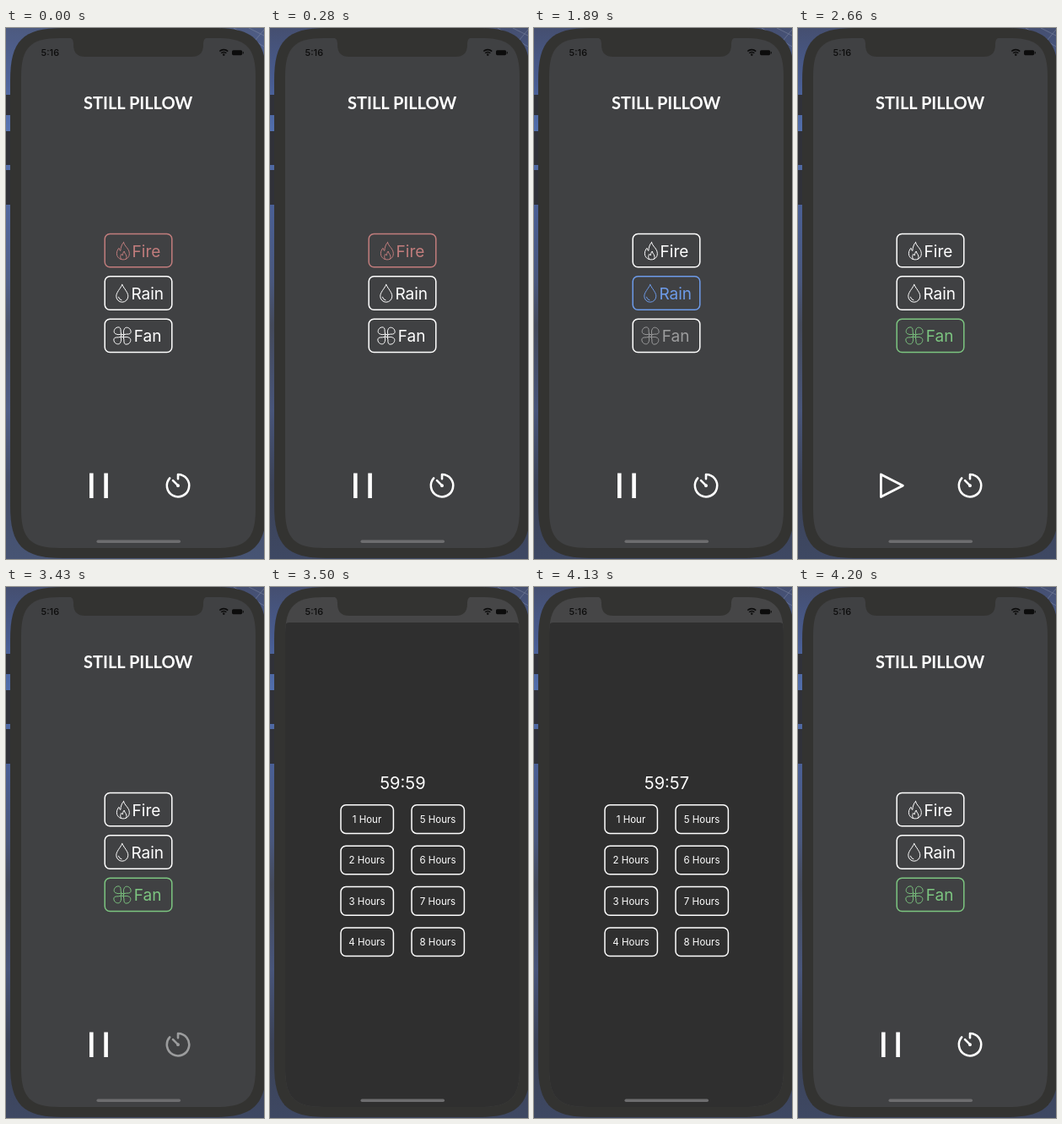
Animation, 306 px wide and 628 px high, one loop 4690 ms. Source, as an HTML page:

```html
<!DOCTYPE html>
<html lang="en">
<head>
<meta charset="utf-8">
<title>Sleep sounds</title>
<style>
  html, body { margin: 0; width: 100%; height: 100%; overflow: hidden; background: #333331; }
  svg { display: block; width: 306px; height: 628px; }
  text { font-family: Inter, Roboto, sans-serif; fill: #fff; }
  .title { font: 700 20px Lato, "Open Sans", sans-serif; text-anchor: middle; }
  .clock { font-size: 11px; font-weight: 500; fill: #0c0c0c; }
  .line { fill: none; stroke: currentColor; stroke-width: 1; stroke-linejoin: round; stroke-linecap: round; }
  .box { fill: none; stroke: currentColor; stroke-width: 1.5; }
  .sound { color: #fff; }
  .sound text { font-size: 19px; fill: currentColor; }
  .bold { fill: none; stroke: #fff; stroke-width: 2.8; stroke-linejoin: round; stroke-linecap: round; }
  .count { font-size: 20px; text-anchor: middle; }
  .hour { color: #fff; }
  .hour text { font-size: 11.5px; text-anchor: middle; }
</style>
</head>
<body>
<svg viewBox="0 0 306 628">
  <defs>
    <linearGradient id="sky" x1="0" y1="0" x2="0" y2="1">
      <stop offset="0" stop-color="#454f70"/>
      <stop offset=".1" stop-color="#485c91"/>
      <stop offset=".2" stop-color="#5270ae"/>
      <stop offset=".34" stop-color="#4a5f94"/>
      <stop offset=".48" stop-color="#49577c"/>
      <stop offset=".56" stop-color="#444a5b"/>
      <stop offset=".72" stop-color="#48557a"/>
      <stop offset=".86" stop-color="#3b4256"/>
      <stop offset="1" stop-color="#3e4863"/>
    </linearGradient>
    <clipPath id="screen"><path id="glass"/></clipPath>
    <path id="blade" d="M-1.4-2C-3.5-1.2-6-1-8.6-2.6C-11-4.5-9.5-8.5-7-9.6C-4.5-10.8-2.2-10-2-7.6C-1.9-5.5-2-4-1.4-2Z"/>
  </defs>

  <rect width="306" height="628" fill="url(#sky)"/>
  <rect id="glow" width="306" height="628" fill="#7f9cdc"/>
  <path d="M270 0L306 22M288 0L306 9M306 2L296 14" stroke="#8a93ab" stroke-width="1" opacity=".45"/>
  <path d="M0 79h6v24h-6zM0 122h6v40h-6zM0 168h6v41h-6z" fill="#303138"/>
  <path id="body" fill="#333331"/>

  <g clip-path="url(#screen)">
    <rect id="back" x="18" y="12" width="278" height="603"/>

    <g id="home">
      <text class="title" x="156.7" y="96">STILL PILLOW</text>

      <g class="sound" id="fire">
        <rect class="box" x="117.2" y="243.4" width="79.6" height="39.4" rx="6"/>
        <g>
          <path class="line" d="M139.5 253.5c1 5 6.6 7 6.8 13c.2 4.5-3 7.4-7.2 7.4c-4.5 0-7.7-3-7.7-7.2c0-2.6 1-4.6 2.6-6.4c.3 1.6.8 2.6 1.8 3.2c.4-4 1.2-7.3 3.7-10z"/>
          <path class="line" d="M136.8 273.4c-2-2.4-1-4.4 0-6l1.6 1.6c0-2 .6-3.6 1.8-5c.4 3 3 4 2.8 6.8c0 1-.4 1.9-1.2 2.6"/>
          <text x="149.6" y="270.6">Fire</text>
        </g>
      </g>

      <g class="sound" id="rain">
        <rect class="box" x="117.2" y="293.8" width="79.6" height="39.4" rx="6"/>
        <g>
          <path class="line" d="M137.8 303.6c-2.4 5-7 9-7 13.6a7 7 0 0 0 14 0c0-4.6-4.6-8.6-7-13.6z"/>
          <path class="line" d="M133.4 318.2a4.6 4.6 0 0 0 3.6 3.6"/>
          <text x="148.4" y="321">Rain</text>
        </g>
      </g>

      <g class="sound" id="fan">
        <rect class="box" x="117.2" y="344.2" width="79.6" height="39.4" rx="6"/>
        <g>
          <g class="line" transform="translate(138 364)">
            <use href="#blade"/>
            <use href="#blade" transform="rotate(90)"/>
            <use href="#blade" transform="rotate(180)"/>
            <use href="#blade" transform="rotate(270)"/>
            <circle r="1.6"/>
          </g>
          <text x="151.8" y="371.4">Fan</text>
        </g>
      </g>

      <path id="pause" d="M99 526.5h4.6v29.5h-4.6zM116.3 526.5h4.6v29.5h-4.6z" fill="#fff"/>
      <path id="play" class="bold" d="M98.4 528L124.4 541.2L98.4 554.6Z"/>
      <g id="timer" class="bold">
        <path d="M204 533.2V528A13.2 13.2 0 1 1 194.2 532.4" stroke-width="2.6"/>
        <path d="M198 535.2L204 541.2" stroke-width="2.6"/>
        <circle cx="204" cy="541.2" r=".6"/>
      </g>
    </g>

    <g id="sheet">
      <path d="M18 615V47q0-5 5-5H291q5 0 5 5V615Z" fill="#2f2f2f"/>
      <text class="count" id="count" x="157.4" y="239"></text>
      <g id="hours"></g>
    </g>
    <rect x="107.5" y="605.6" width="99.5" height="3.3" rx="1.6" fill="#6d6d6f"/>
  </g>

  <path d="M74 11Q80 12 80 18V20Q80 34 94 34H220Q234 34 234 20V18Q234 12 240 11Z" fill="#333331"/>
  <text class="clock" x="41.6" y="33">5:16</text>
  <g fill="none" stroke="#0c0c0c" stroke-width="1.6">
    <path d="M253.4 27.6a7 7 0 0 1 9.8 0M255.3 29.8a4.2 4.2 0 0 1 6 0"/>
    <circle cx="258.3" cy="31.6" r=".5"/>
  </g>
  <rect x="268" y="26.2" width="12.2" height="6" rx="1.7" fill="#0c0c0c"/>
  <rect x="280.8" y="28" width="1" height="2.4" rx=".5" fill="#0c0c0c"/>
</svg>

<script>
const LOOP = 4690, STEP = 70, DIM = 0.48;
const $ = id => document.getElementById(id);
const tint = { fire: '#c27d7d', rain: '#6d9be9', fan: '#7cc580' };

// Each row: start time, value held until the next row
const chosen = [[0, 'fire'], [1050, 'rain'], [2030, 'fan']];
const playing = [[0, true], [2660, false], [2940, true]];
const sheetOpen = [[0, false], [3500, true], [4200, false]];
const counter = [[0, '59:59'], [4060, '59:58'], [4130, '59:57']];
const press = {
  fire: [[0, 1]],
  rain: [[0, 1], [910, DIM], [1050, 0.65], [1120, 0.85], [1190, 1]],
  fan: [[0, 1], [1820, 0.6], [1890, DIM], [2030, 1]],
  pause: [[0, 1], [2520, DIM], [2660, 1]],
  play: [[0, 1], [2870, DIM], [2940, 1]],
  timer: [[0, 1], [3220, 0.6], [3290, DIM], [3500, 1]]
};
const glow = [[0, 0.14], [70, 0.1], [140, 0.07], [210, 0.03], [280, 0]];

const at = (rows, t) => rows.filter(r => r[0] <= t).pop()[1];
const show = (id, on) => $(id).style.display = on ? '' : 'none';

// Rectangle with smooth corners: a is the corner's reach, b its tightness
function smoothRect(l, t, r, d, a, b) {
  return `M${l} ${t + a}C${l} ${t + b} ${l + b} ${t} ${l + a} ${t}H${r - a}` +
    `C${r - b} ${t} ${r} ${t + b} ${r} ${t + a}V${d - a}` +
    `C${r} ${d - b} ${r - b} ${d} ${r - a} ${d}H${l + a}` +
    `C${l + b} ${d} ${l} ${d - b} ${l} ${d - a}Z`;
}
$('body').setAttribute('d', smoothRect(5, 0, 309, 627, 62, 15));
$('glass').setAttribute('d', smoothRect(18, 12, 296, 615, 46, 11));

$('hours').innerHTML = Array.from({ length: 8 }, (_, i) => {
  const x = 84 + 84 * (i >> 2), y = 257.8 + 48.4 * (i % 4);
  return `<g class="hour"><rect class="box" x="${x}" y="${y}" width="62.4" height="33.6" rx="6"/>
    <text x="${x + 31}" y="${y + 21.1}">${i + 1} Hour${i ? 's' : ''}</text></g>`;
}).join('');

function draw(now) {
  const t = Math.floor((now % LOOP) / STEP) * STEP;
  const open = at(sheetOpen, t), on = at(playing, t), pick = at(chosen, t);
  show('home', !open);
  show('sheet', open);
  show('pause', on);
  show('play', !on);
  $('back').setAttribute('fill', open ? '#464647' : '#404143');
  $('count').textContent = at(counter, t);
  $('glow').style.opacity = at(glow, t);
  for (const id in tint) {
    $(id).style.color = id === pick ? tint[id] : '#fff';
    $(id).lastElementChild.style.opacity = at(press[id], t);
  }
  for (const id of ['pause', 'play', 'timer']) $(id).style.opacity = at(press[id], t);
}

function tick() {
  draw(performance.now());
  requestAnimationFrame(tick);
}
tick();
</script>
</body>
</html>
```
